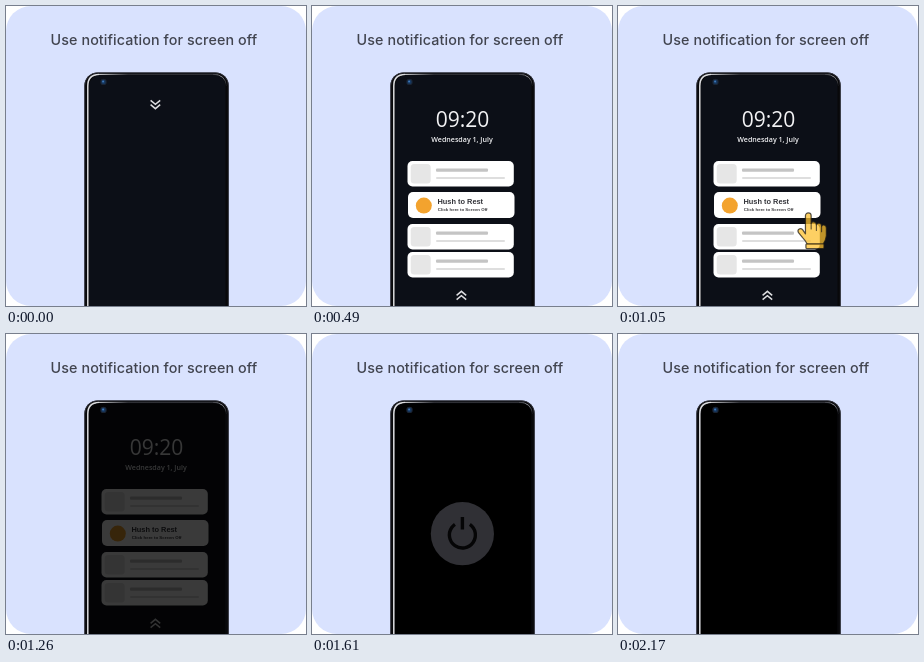
Recreate the animation shown at these times as an HTML page with a canvas. Size 300 by 300 pixels, loop 2.31 s.

```html
<!DOCTYPE html>
<html lang="en">
<head>
<meta charset="utf-8">
<title>Screen off notification</title>
<style>
  html, body { margin: 0; width: 100%; height: 100%; overflow: hidden; background: #fff; }
  canvas { display: block; width: 300px; height: 300px; }
</style>
</head>
<body>
<canvas id="stage"></canvas>
<script>
const LOOP = 2310, STEP = 70;
const canvas = document.getElementById('stage');
const ctx = canvas.getContext('2d');
const ratio = window.devicePixelRatio || 1;
canvas.width = canvas.height = Math.round(300 * ratio);

const clamp = v => Math.min(1, Math.max(0, v));
const ramp = (t, from, to) => clamp((t - from) / (to - from));
const easeOut = p => 1 - (1 - p) ** 3;
const easeInOut = p => p < 0.5 ? 4 * p ** 3 : 1 - 4 * (1 - p) ** 3;

function box(x, y, w, h, r, fill) {
  ctx.beginPath();
  ctx.roundRect(x, y, w, h, r);
  ctx.fillStyle = fill;
  ctx.fill();
}

function disc(x, y, r, fill) {
  ctx.beginPath();
  ctx.arc(x, y, r, 0, Math.PI * 2);
  ctx.fillStyle = fill;
  ctx.fill();
}

function label(text, x, y, font, fill, align = 'center', spacing = 0) {
  ctx.font = font;
  ctx.textAlign = align;
  ctx.letterSpacing = spacing + 'px';
  ctx.fillStyle = fill;
  ctx.fillText(text, x, y);
}

function line(width, stroke, trace) {
  ctx.beginPath();
  trace();
  ctx.lineWidth = width;
  ctx.strokeStyle = stroke;
  ctx.stroke();
}

function gradient(x0, y0, x1, y1, ...colors) {
  const g = ctx.createLinearGradient(x0, y0, x1, y1);
  colors.forEach((c, i) => g.addColorStop(i / (colors.length - 1), c));
  return g;
}

function backdrop() {
  ctx.fillStyle = '#fff';
  ctx.fillRect(0, 0, 300, 300);
  box(0, 0, 300, 300, 25, '#d9e2fe');
  label('Use notification for screen off', 147.9, 38.8,
    '500 14.3px Inter, sans-serif', '#41444f', 'center', 0.1);
}

function phoneBody() {
  box(78.4, 66.5, 144.3, 260, 13, '#08080a');
  line(0.8, '#3a3c47', () => ctx.roundRect(78.7, 66.8, 143.7, 260, 12.7));
  line(1.5, '#dcdde0', () => {
    ctx.moveTo(81.8, 302);
    ctx.lineTo(81.8, 80);
    ctx.quadraticCurveTo(81.8, 68.6, 93, 68.6);
  });
  line(1, gradient(93, 0, 122, 0, '#dcdde0', '#33343a'), () => {
    ctx.moveTo(93, 68.4);
    ctx.lineTo(212, 68.4);
  });
  line(1, gradient(207, 67, 220, 79, '#33343a', '#94969d', '#16171b'), () => {
    ctx.moveTo(207, 68.4);
    ctx.quadraticCurveTo(219.5, 68.4, 220.4, 80);
  });
}

function camera() {
  disc(97.5, 75.9, 3.2, '#1b2433');
  disc(97.5, 75.9, 2.2, '#16375f');
  disc(97.1, 75.6, 1, '#3f78b8');
}

function plainCard(y) {
  box(95.5, y, 106.3, 25.5, 5, '#fff');
  box(98.7, y + 3, 20, 19.6, 3.5, '#e6e6e6');
  box(124, y + 7.4, 52, 3.4, 1, '#c4c4c4');
  box(124, y + 16.1, 69, 2, 1, '#dedede');
}

function appCard(y, scale) {
  ctx.save();
  ctx.translate(149.5, y + 13.2);
  ctx.scale(scale, scale);
  ctx.translate(-149, -13.2);
  box(95.5, 0, 106.5, 26, 5, '#fff');
  disc(111.3, 13.6, 8, '#f3a32e');
  label('Hush to Rest', 125, 12, 'bold 7.4px "Liberation Sans", Arial, sans-serif', '#33343a', 'left');
  label('Click here to Screen Off', 125.3, 19.4, 'bold 4.4px "Liberation Sans", Arial, sans-serif', '#3b3b3f', 'left');
  ctx.restore();
}

function chevrons(y, dir) {
  for (const dy of [-2.2, 2.2]) {
    line(1.5, '#dcdcdf', () => {
      ctx.moveTo(144.6, y + dy - 2 * dir);
      ctx.lineTo(149.4, y + dy + 2 * dir);
      ctx.lineTo(154.2, y + dy - 2 * dir);
    });
  }
}

function clock() {
  label('09:20', 150.5, 121.4, '400 21px "Open Sans", sans-serif', '#f2f2f4');
  label('Wednesday 1, July', 150, 136.1, '600 7.1px "Open Sans", sans-serif', '#f2f2f4');
}

function powerButton() {
  disc(150.4, 199.7, 31.6, '#303035');
  line(3.4, '#050506', () => ctx.arc(150.4, 201, 13, -0.96, Math.PI + 0.96));
  line(3.4, '#050506', () => {
    ctx.moveTo(150.4, 183);
    ctx.lineTo(150.4, 195.5);
  });
}

// Pointing hand; the origin is the fingertip.
function hand(x, y) {
  ctx.save();
  ctx.translate(x, y);
  ctx.scale(0.95, 0.95);
  ctx.lineJoin = ctx.lineCap = 'round';
  ctx.beginPath();
  ctx.moveTo(-3, 22);
  ctx.lineTo(-3, 3);
  ctx.bezierCurveTo(-3, -1, 3, -1, 3, 3);
  ctx.lineTo(3, 11);
  ctx.bezierCurveTo(4, 8.5, 8.5, 9, 8.5, 12.5);
  ctx.bezierCurveTo(10, 9.8, 14, 10.5, 14, 13.8);
  ctx.bezierCurveTo(15.5, 11.8, 19, 12.5, 19, 16);
  ctx.lineTo(19, 24);
  ctx.quadraticCurveTo(18.5, 29, 15.5, 33);
  ctx.lineTo(-1, 33);
  ctx.quadraticCurveTo(-3, 29, -6, 26);
  ctx.lineTo(-10.5, 20.5);
  ctx.bezierCurveTo(-12, 17, -8, 15.3, -6, 17.7);
  ctx.closePath();
  ctx.fillStyle = '#fdc02f';
  ctx.fill();
  ctx.lineWidth = 1.3;
  ctx.strokeStyle = '#1d1a14';
  ctx.stroke();
  line(1.1, '#1d1a14', () => {
    for (const [fx, top] of [[3, 11], [8.5, 12.5], [14, 13.8]]) {
      ctx.moveTo(fx, top);
      ctx.lineTo(fx, top + 6);
    }
  });
  box(-2.5, 32.5, 19, 5, 1, '#fdc02f');
  line(1.3, '#1d1a14', () => ctx.roundRect(-2.5, 32.5, 19, 5, 1));
  ctx.restore();
}

function faded(alpha, paint) {
  if (alpha <= 0) return;
  ctx.save();
  ctx.globalAlpha = alpha;
  paint();
  ctx.restore();
}

function screen(t) {
  const left = 1 - easeInOut(ramp(t, 0, 490));
  const shift = -181 * left;
  const press = 1 + 0.025 * Math.sin(Math.PI * ramp(t, 700, 980));
  const dim = t < 1190 ? 0 : 1 - 0.6 * (1 - ramp(t, 1190, 1400)) ** 2.4;

  ctx.save();
  ctx.beginPath();
  ctx.roundRect(83, 69.3, 136.5, 250, 10.5);
  ctx.clip();
  ctx.fillStyle = '#0c0f17';
  ctx.fillRect(80, 60, 150, 250);
  if (dim < 1) {
    faded(ramp(t, 280, 420), clock);
    faded(ramp(t, 0, 210), () => {
      for (const y of [155, 218, 246]) plainCard(y + shift);
      appCard(186 + shift, press);
    });
    chevrons(289.5 - 191 * left, t < 420 ? 1 : -1);
  }
  faded(dim, () => {
    ctx.fillStyle = '#000';
    ctx.fillRect(80, 60, 150, 250);
  });
  faded(ramp(t, 1470, 1610) * (1 - ramp(t, 1750, 2170)), powerButton);
  ctx.restore();
}

function draw(t) {
  ctx.setTransform(ratio, 0, 0, ratio, 0, 0);
  backdrop();
  phoneBody();
  screen(t);
  camera();
  const away = 1 - easeOut(ramp(t, 560, 770)) + ramp(t, 980, 1120) ** 2;
  faded(1 - away, () => hand(186.8 + 14 * away, 198.4 + 34 * away));
}

const start = performance.now();
function tick() {
  const t = (performance.now() - start) % LOOP;
  draw(Math.floor(t / STEP) * STEP);
  requestAnimationFrame(tick);
}
tick();
</script>
</body>
</html>
```
